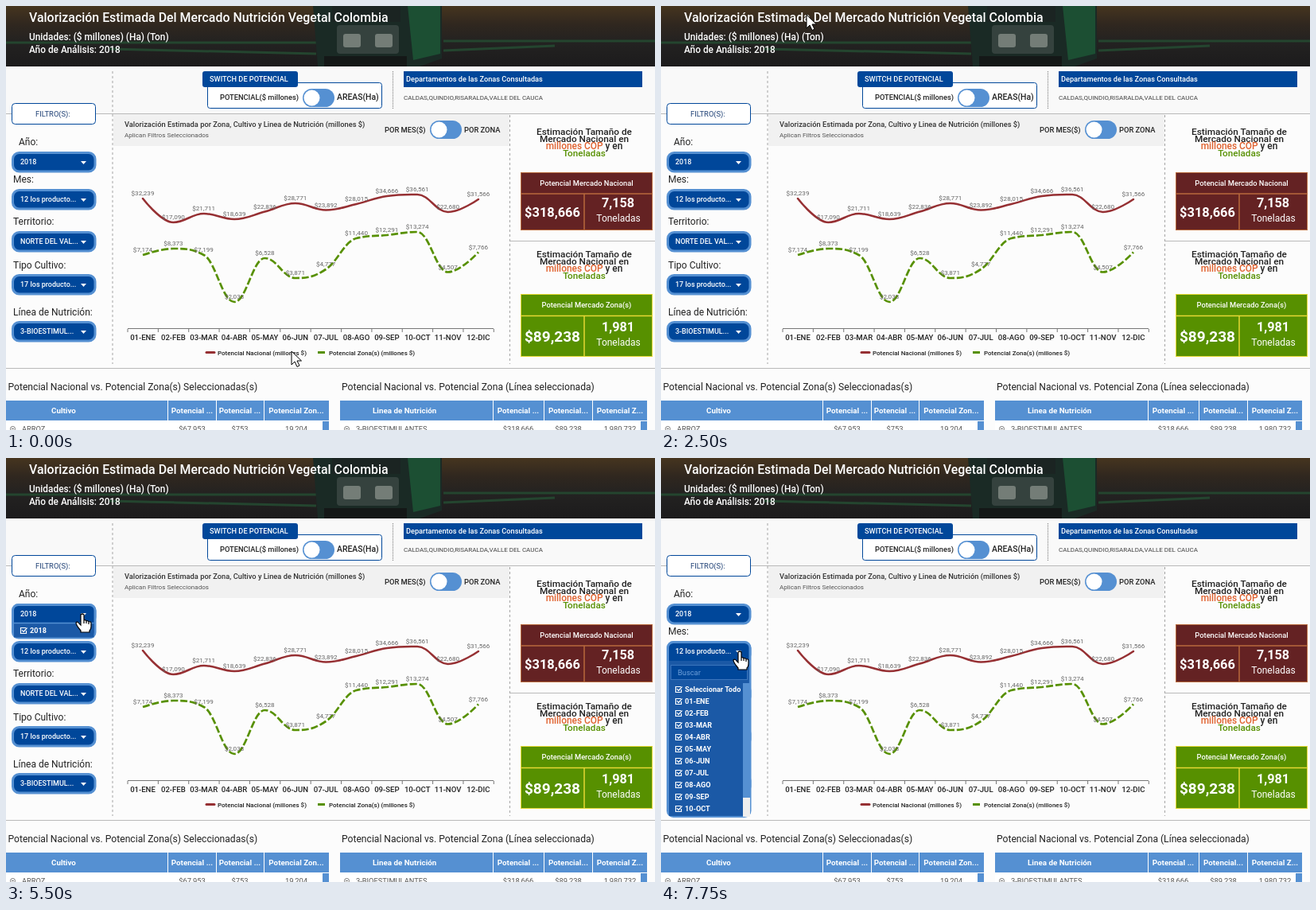
These frames come from a looping animation (816x533 px, 8 s). An HTML page:

```html
<!DOCTYPE html>
<html lang="es">
<head>
<meta charset="utf-8">
<style>
html, body { margin: 0; width: 100%; height: 100%; overflow: hidden; background: #fcfcfc; }
svg { display: block; width: 816px; height: 533px; font-family: Roboto, Arial, sans-serif; }
</style>
</head>
<body>
<svg id="stage" viewBox="0 0 816 533"></svg>
<script>
const NAVY = '#00479a', SKY = '#5590d2', INK = '#222', RED = '#963033', GREEN = '#579000', MAROON = '#642223';
const MONTHS = ['ENE', 'FEB', 'MAR', 'ABR', 'MAY', 'JUN', 'JUL', 'AGO', 'SEP', 'OCT', 'NOV', 'DIC']
  .map((m, i) => String(i + 1).padStart(2, '0') + '-' + m);
const monthX = i => 172 + i * 38.36;

const text = (x, y, s, size, fill = INK, weight = 400, anchor = 'start') =>
  `<text x="${x}" y="${y}" font-size="${size}" fill="${fill}" font-weight="${weight}" text-anchor="${anchor}">${s}</text>`;
const mid = (x, y, s, size, fill, weight) => text(x, y, s, size, fill, weight, 'middle');
const rect = (x, y, w, h, fill, r = 0, extra = '') =>
  `<rect x="${x}" y="${y}" width="${w}" height="${h}" fill="${fill}" rx="${r}" ${extra}/>`;
const path = (d, stroke, width = 1, extra = 'fill="none"') =>
  `<path d="${d}" stroke="${stroke}" stroke-width="${width}" ${extra}/>`;
const shape = (d, fill) => `<path d="${d}" fill="${fill}"/>`;

// Smooth curve whose peaks stay on the data points
function spline(ys) {
  const p = ys.map((y, i) => ({ x: monthX(i), y }));
  let d = `M${p[0].x},${p[0].y}`, ctrl = p[0];
  for (let i = 1; i < p.length; i++) {
    const a = p[i - 1], b = p[i], c = p[i + 1];
    let left = b, right = b;
    if (c) {
      let ly = (1.5 * b.y + a.y) / 2.5, ry = (1.5 * b.y + c.y) / 2.5;
      const fix = b.y - (ly + ry) / 2;
      ly += fix; ry += fix;
      const clamp = (v, o) => Math.min(Math.max(v, Math.min(o, b.y)), Math.max(o, b.y));
      const l = clamp(ly, a.y);
      if (l !== ly) { ly = l; ry = 2 * b.y - l; }
      const r = clamp(ry, c.y);
      if (r !== ry) { ry = r; ly = 2 * b.y - r; }
      left = { x: (1.5 * b.x + a.x) / 2.5, y: ly };
      right = { x: (1.5 * b.x + c.x) / 2.5, y: ry };
    }
    d += `C${ctrl.x},${ctrl.y} ${left.x},${left.y} ${b.x},${b.y}`;
    ctrl = right;
  }
  return d;
}

function header() {
  return `<defs><linearGradient id="field" x2="0" y2="1"><stop stop-color="#46351f"/>
    <stop offset=".3" stop-color="#30271f"/><stop offset=".6" stop-color="#232221"/>
    <stop offset="1" stop-color="#1c1b1c"/></linearGradient></defs>` +
    rect(0, 0, 816, 76, 'url(#field)') +
    path('M0,46H390M130,54L390,60M550,44H816M550,56L690,50', '#24452f', 3) +
    shape('M386,0H548V66L520,76H392Z', '#1a2a25') +
    shape('M505,0H546V60L512,68Z', '#1c4f33') +
    rect(410, 0, 86, 20, '#1b2422') +
    rect(416, 24, 78, 36, '#35423e', 4) +
    rect(424, 35, 22, 17, '#747d77', 3) + rect(464, 35, 22, 17, '#747d77', 3) +
    rect(400, 63, 104, 13, '#141817') +
    text(29, 20, 'Valorización Estimada Del Mercado Nutrición Vegetal Colombia', 15.9, '#fff', 500) +
    text(29, 43, 'Unidades: ($ millones) (Ha) (Ton)', 11.85, '#fff', 500) +
    text(29, 59, 'Año de Análisis: 2018', 11.85, '#fff', 500);
}

function toggle(x, y) {
  return rect(x, y, 40, 23, SKY, 11.5) + `<circle cx="${x + 11.5}" cy="${y + 11.5}" r="10" fill="#fff"/>`;
}

function controls() {
  return rect(0, 76, 816, 60, '#f9f9f9') + rect(135, 136, 498, 40, '#f1f1f1') +
    path('M0,135.5H816M0,455.5H816M634,295.5H816', '#b9b9b9') +
    path('M134,82V450M633.5,137V450', '#a5a5a5', 1, 'stroke-dasharray="3 3"') +
    path('M486.5,82V129', '#777', 1, 'stroke-dasharray="1 1"') +
    rect(253.5, 96.5, 219, 32, '#fff', 3, `stroke="${NAVY}"`) + rect(247, 82, 120, 20, NAVY, 3) +
    text(256, 95, 'SWITCH DE POTENCIAL', 9.2, '#fff', 500) +
    text(269, 118, 'POTENCIAL($ millones)', 9.3, INK, 500) + toggle(373, 104) +
    text(416, 118, 'AREAS(Ha)', 10.4, INK, 500) +
    rect(500, 82, 300, 20, NAVY) +
    text(503, 95, 'Departamentos de las Zonas Consultadas', 9.2, '#fff', 500) +
    text(500, 118, 'CALDAS,QUINDIO,RISARALDA,VALLE DEL CAUCA', 8, '#444');
}

function select(cy, s) {
  return rect(8.5, cy - 11.5, 103.5, 23.5, NAVY, 8, `stroke="${SKY}" stroke-width="3"`) +
    text(18, cy + 3.3, s, 9, '#fff', 500) + caret(cy);
}
const caret = cy => shape(`M94,${cy - 1}h7l-3.5,4z`, '#fff');

function filters() {
  return rect(7.5, 122.5, 105, 26, '#fff', 4, `stroke="${NAVY}"`) +
    text(37, 139, 'FILTRO(S):', 9.4, '#1d3f74') +
    text(16, 175, 'Año:', 12) + text(9, 222, 'Mes:', 12) + text(9, 275, 'Territorio:', 12) +
    text(9, 330, 'Tipo Cultivo:', 12) + text(9, 389, 'Línea de Nutrición:', 12) +
    select(196, '2018') + select(243, '12 los producto...') + select(296, 'NORTE DEL VAL...') +
    select(350, '17 los producto...') + select(409, '3-BIOESTIMUL...');
}

function chart() {
  const national = [242, 272, 261, 268, 258.5, 248, 256.5, 249, 239, 237, 259, 243];
  const zone = [313, 305, 313, 372, 317, 342, 331, 292, 288, 284, 334.5, 309.5];
  const amounts = [
    '32,239 17,090 21,711 18,639 22,836 28,771 23,892 28,015 34,666 36,561 22,680 31,566',
    '7,174 8,373 7,199 2,033 6,528 3,871 4,777 11,440 12,291 13,274 4,507 7,766'];
  const labels = [national, zone].map((ys, k) => amounts[k].split(' ')
    .map((v, i) => mid(monthX(i), ys[i] - 4, '$' + v, 8.1, '#666')).join('')).join('');
  const ticks = Array.from({ length: 13 }, (_, i) => `M${153 + i * 38.36},406v4`).join('');
  return text(149, 152, 'Valorización Estimada por Zona, Cultivo y Linea de Nutrición (millones $)', 9.3, '#333', 500) +
    text(149, 165, 'Aplican Filtros Seleccionados', 8.1, '#555') +
    text(476, 158.5, 'POR MES($)', 9.35, INK, 500) + toggle(533, 144) + text(576, 158.5, 'POR ZONA', 9.35, INK, 500) +
    path('M153,405.5H613' + ticks, '#777') +
    `<circle id="halo" cx="${monthX(4)}" cy="258.5" r="6.5" fill="${RED}" opacity=".25"/>` +
    path(spline(national), RED, 2.5, 'id="national" fill="none" stroke-linecap="round"') +
    path(spline(zone), GREEN, 2.7, 'fill="none" stroke-dasharray="9 3"') + labels +
    MONTHS.map((m, i) => mid(monthX(i), 420, m, 9.6, INK, 500)).join('') +
    path('M252,435.5H262', RED, 3, 'stroke-linecap="round"') +
    text(266, 438.5, 'Potencial Nacional (millones $)', 8, INK, 500) +
    path('M392,435.5H401', GREEN, 3, '') +
    text(406, 438.5, 'Potencial Zona(s) (millones $)', 8, INK, 500);
}

function card(top, y, h, rowH, fill, line, title, money, size, tons) {
  const cut = y + rowH, cy = (cut + y + h) / 2;
  return mid(727, top, 'Estimación Tamaño de', 11.8, INK, 500) +
    mid(727, top + 9, 'Mercado Nacional en', 11.8, INK, 500) +
    mid(727, top + 18, '<tspan fill="#e0622f">millones COP</tspan> y en', 11.9, INK, 500) +
    mid(727, top + 27, 'Toneladas', 11.7, GREEN, 500) +
    rect(647.5, y + .5, 165, h - 1, fill, 0, `stroke="${line}"`) +
    path(`M647,${cut}H813M727,${cut}V${y + h}`, line, 1.5) +
    mid(730, y + 16.5, title, 9.3, '#fff', 500) +
    mid(687, cy + size * .34, money, size, '#fff', 700) +
    mid(769.5, cy - 6, tons, 16.2, '#fff', 700) + mid(770, cy + 12, 'Toneladas', 12, '#fff');
}

function table(x, w, title, titleX, first, firstX, cols, row) {
  const [name, ...cells] = row;
  return text(titleX, 483, title, 12.12) + rect(x, 521, w, 12, '#fff') + rect(x, 496, w, 25, SKY) +
    rect(x + w - 8, 522, 8, 11, SKY) + text(firstX, 512, first, 9.8, '#fff', 700) +
    cols.map(([cut, cx, s], i) => path(`M${cut},496V521`, '#fff') +
      mid(cx, 512, s, 9.8, '#fff', 700) + mid(cx, 534.5, cells[i], 9.4, '#555')).join('') +
    `<circle cx="${x + 8.5}" cy="531.5" r="3" fill="none" stroke="#777"/>` +
    path(`M${x + 7},531.5h3`, '#777') + text(x + 20, 534.5, name, 9.3, '#555');
}

function option(cy, s) {
  return path(`M25,${cy - 3.5}H18.5V${cy + 3.5}H25.5V${cy}M20,${cy - 1}l2,2.5l4.5,-5`, '#fff', 1.2) +
    text(30, cy + 3.3, s, 9.1, '#fff', 700);
}

function yearMenu() {
  return `<g id="year">` + rect(8.5, 184.5, 103.5, 41.5, NAVY, 7, `stroke="${SKY}" stroke-width="3"`) +
    rect(10, 208, 100.5, 17.5, '#1b59a6') + path('M10,207.5H110.5', SKY, 1.5) +
    text(18, 199.3, '2018', 9, '#fff', 500) + caret(196) + option(217, '2018') + '</g>';
}

function monthMenu() {
  return `<g id="month">` + rect(8.5, 231.5, 103.5, 219, NAVY, 7, `stroke="${SKY}" stroke-width="3"`) +
    text(18, 246.3, '12 los producto...', 9, '#fff', 500) + caret(243) +
    rect(10, 255, 100.5, 195, '#1b59a6') +
    rect(12.5, 260.5, 96, 18, NAVY, 0, 'stroke="#3c76bd"') + text(21, 273, 'Buscar', 9.3, '#6fa0da') +
    ['Seleccionar Todo', ...MONTHS.slice(0, 10)].map((s, i) => option(291 + i * 15, s)).join('') +
    rect(103, 283, 9, 168, '#eee') + rect(103, 283, 9, 144, SKY) + '</g>';
}

const stage = document.getElementById('stage');
stage.innerHTML = rect(0, 0, 816, 533, '#fcfcfc') + header() + controls() + filters() + chart() +
  card(162, 209, 73, 27, MAROON, '#b86a3c', 'Potencial Mercado Nacional', '$318,666', 16.4, '7,158') +
  card(316, 362, 79, 27.5, GREEN, '#e6d834', 'Potencial Mercado Zona(s)', '$89,238', 19, '1,981') +
  table(0, 406, 'Potencial Nacional vs. Potencial Zona(s) Seleccionadas(s)', 2.5, 'Cultivo', 57,
    [[203.5, 234, 'Potencial ...'], [264.5, 294, 'Potencial ...'], [324.5, 365, 'Potencial Zon...']],
    ['ARROZ', '$67,953', '$753', '19,204']) +
  table(420, 386, 'Potencial Nacional vs. Potencial Zona (Línea seleccionada)', 422, 'Linea de Nutrición', 461,
    [[612.5, 644, 'Potencial ...'], [676.5, 707, 'Potencial...'], [737.5, 772, 'Potencial Z...']],
    ['3-BIOESTIMULANTES', '$318,666', '$89,238', '1,980,732']) +
  yearMenu() + monthMenu() +
  path('M0,0V17L4,13L7,19.5L10,18L7,12H12.5Z', '#000', 1, 'id="arrow" fill="#fff"') +
  path('M-2,1q2,-2 4,0V8q2,-1 3,1q2,-1 3,1q3,-1 3,2V16q0,3 -2,5V23H-2V21Q-8,14 -8,11q2,-2 4,1l2,2Z' +
    'M2,8v4M5,9v3M8,10v3', '#000', 1.2, 'id="hand" fill="#fff"');

// Pointer path: time, x, y
const TRACK = [[0, 359, 434], [250, 352, 395], [500, 326, 268], [750, 321, 181], [1000, 312, 111], [1250, 292, 125],
  [1500, 195, 85], [1750, 60, 45], [2000, 31, 20], [2500, 183, 11], [3250, 430, 18], [3500, 484, 28], [3750, 468, 15],
  [4250, 270, 128], [4500, 166, 162], [4750, 120, 184], [5000, 88, 202], [5500, 96, 196], [6500, 96, 196],
  [7250, 100, 234], [7750, 99, 243], [8000, 99, 243]];

function pointer(t) {
  const i = TRACK.findIndex(k => k[0] > t), a = TRACK[i - 1], b = TRACK[i];
  const f = (t - a[0]) / (b[0] - a[0]);
  return [a[1] + (b[1] - a[1]) * f, a[2] + (b[2] - a[2]) * f].map(Math.round);
}

const el = id => document.getElementById(id);
const show = (id, on) => el(id).setAttribute('display', on ? 'inline' : 'none');

function draw(now) {
  const t = Math.floor(now % 8000 / 250) * 250; // the screen refreshes four times a second
  const hover = t >= 500 && t < 1000, overSelect = t >= 5000;
  const move = `translate(${pointer(t)})`;
  el('arrow').setAttribute('transform', move);
  el('hand').setAttribute('transform', move);
  show('arrow', !overSelect);
  show('hand', overSelect);
  show('halo', hover);
  el('national').setAttribute('stroke-width', hover ? 3.5 : 2.5);
  show('year', t >= 5500 && t < 6750);
  show('month', t >= 7750);
}

const start = performance.now();
function loop() {
  draw(performance.now() - start);
  requestAnimationFrame(loop);
}
loop();
</script>
</body>
</html>
```
